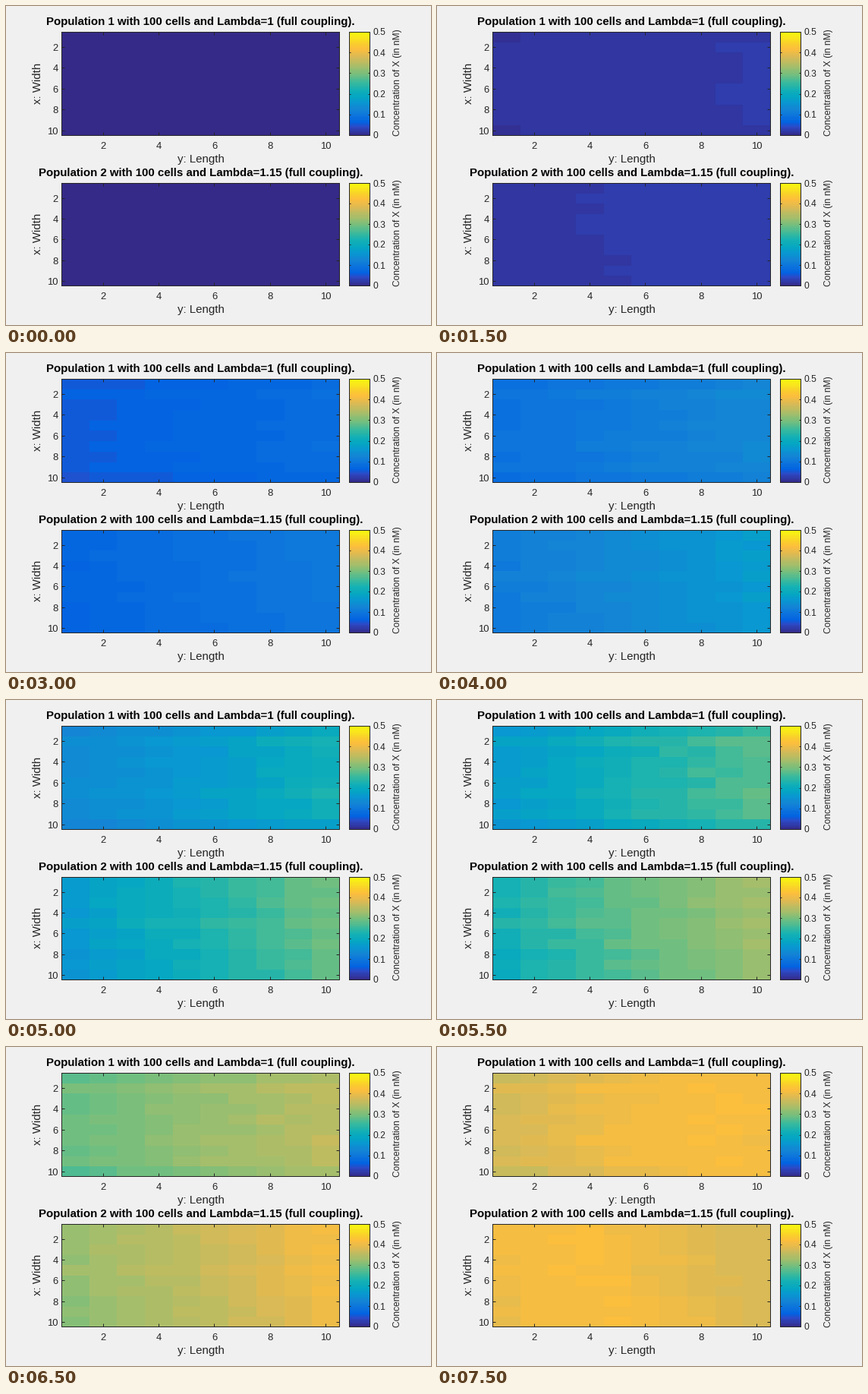
These frames come from a looping animation (560x420 px, 8000 ms). A matplotlib script:

```python
import numpy as np
import matplotlib.pyplot as plt
from matplotlib.animation import FuncAnimation
from matplotlib.colors import LinearSegmentedColormap

W, H = 560, 420
STEP, STEPS = 500, 16
LEVELS, CELLS = 64, 10
INK = (0.15, 0.15, 0.15)
PX = 0.72  # points per pixel at 100 dpi

plt.rcParams["font.family"] = "Liberation Sans"

# Parula colour map from a few key levels
PARULA = LinearSegmentedColormap.from_list("parula", [
    (level / (LEVELS - 1), colour) for level, colour in (
        (0, "#352a87"), (5, "#2c4ac7"), (8, "#0363e1"), (12, "#0d75dc"),
        (16, "#1485d4"), (20, "#0998d1"), (24, "#06a7c2"), (28, "#15b1b4"),
        (32, "#38b99e"), (37, "#71bf80"), (42, "#a5be6b"), (48, "#d9ba56"),
        (53, "#fdbe3d"), (57, "#fad32a"), (63, "#f9fb0e"))], N=LEVELS)

# Colour level of the fastest cell: a rise that peaks and turns back (ms, level)
RISE = ((950, 0), (1500, 3.7), (3000, 13), (4000, 20.8), (5000, 36.6),
        (6000, 46), (6550, 52), (6900, 53.2), (7500, 48.3))
MAX_LAG = 1500

# Lag falls evenly from the first column to the last
POPULATIONS = [
    dict(title="Population 1 with 100 cells and Lambda=1 (full coupling).",
         top=34, bottom=171, first=1.0, last=0.43, seed=3),
    dict(title="Population 2 with 100 cells and Lambda=1.15 (full coupling).",
         top=233, bottom=369, first=0.72, last=0.0, seed=8),
]


def cell_lags(pop):
    """Relative lag of every cell, with some spread by row and by cell."""
    rng = np.random.default_rng(pop["seed"])
    rows = rng.normal(0, 0.035, (CELLS, 1))
    cells = rng.normal(0, 0.025, (CELLS, CELLS))
    return np.linspace(pop["first"], pop["last"], CELLS) + rows + cells


def concentration(lags, t):
    """Colour level of each cell at time t."""
    spread = MAX_LAG * np.sin(np.pi * max(t - 1000, 0) / 10000)
    return np.floor(np.interp(t - lags * spread, *zip(*RISE)))


fig = plt.figure(figsize=(W / 100, H / 100), dpi=100, facecolor="#f0f0f0")
ax = fig.add_axes((0, 0, 1, 1))


def line(xs, ys):
    ax.plot(xs, ys, color=INK, lw=PX, solid_capstyle="butt",
            solid_joinstyle="miter", snap=False, zorder=3)


def ticks(x, y, dx, dy):
    """Inward tick, centred on a pixel across its direction."""
    x, y = np.floor(x) + 0.5, np.floor(y) + 0.5
    line((x, x + dx), (y, y + dy))


def label(x, y, text, size, ha="center", **kw):
    kw.setdefault("color", INK)
    ax.text(x, y, text, fontsize=size * PX, ha=ha, va="baseline",
            rotation_mode="anchor", **kw)


def framed_image(data, x0, x1, y0, y1):
    img = ax.imshow(data, cmap=PARULA, vmin=-0.5, vmax=LEVELS - 0.5,
                    extent=(x0, x1, y1, y0), aspect="auto",
                    interpolation="nearest", zorder=1)
    l, r, t, b = x0 + 0.5, x1 - 0.5, y0 + 0.5, y1 - 0.5
    line((l, r, r, l, l), (t, t, b, b, t))
    return img


def draw_panel(pop):
    left, right, top, bottom = 73, 440, pop["top"], pop["bottom"]
    mid = (top + bottom) / 2
    img = framed_image(np.zeros((CELLS, CELLS)), left, right, top, bottom)
    for k in range(2, CELLS + 1, 2):
        x = left + (right - left) * (k - 0.5) / CELLS
        y = top + (bottom - top) * (k - 0.5) / CELLS
        ticks(x, top, 0, 4)
        ticks(x, bottom - 1, 0, -4)
        ticks(left, y, 4, 0)
        ticks(right - 1, y, -4, 0)
        label(x, bottom + 16.5, str(k), 13)
        label(69, y + 4.5, str(k), 13, ha="right")
    label(256.3, top - 9, pop["title"], 15, weight="bold", color="black")
    label(256.5, bottom + 35, "y: Length", 15)
    label(45.5, mid - 1, "x: Width", 15, rotation=90)

    c0, c1 = 452, 480
    framed_image(np.arange(LEVELS)[::-1, None], c0, c1, top, bottom)
    for k in range(6):
        y = bottom - 0.5 - (bottom - top - 1) * k / 5
        ticks(c0, y, 2, 0)
        ticks(c1 - 1, y, -2, 0)
        label(484, y + 4, f"{k / 10:g}", 12, ha="left")
    label(519, mid - 2, "Concentration of X (in nM)", 12, rotation=90)
    return img


panels = [(draw_panel(pop), cell_lags(pop)) for pop in POPULATIONS]
ax.set(xlim=(0, W), ylim=(H, 0))
ax.axis("off")


def update(i):
    for img, lags in panels:
        img.set_data(concentration(lags, i * STEP))
    return [img for img, _ in panels]


anim = FuncAnimation(fig, update, frames=STEPS, interval=STEP, repeat=True,
                     repeat_delay=0, blit=False)
plt.show()
```
